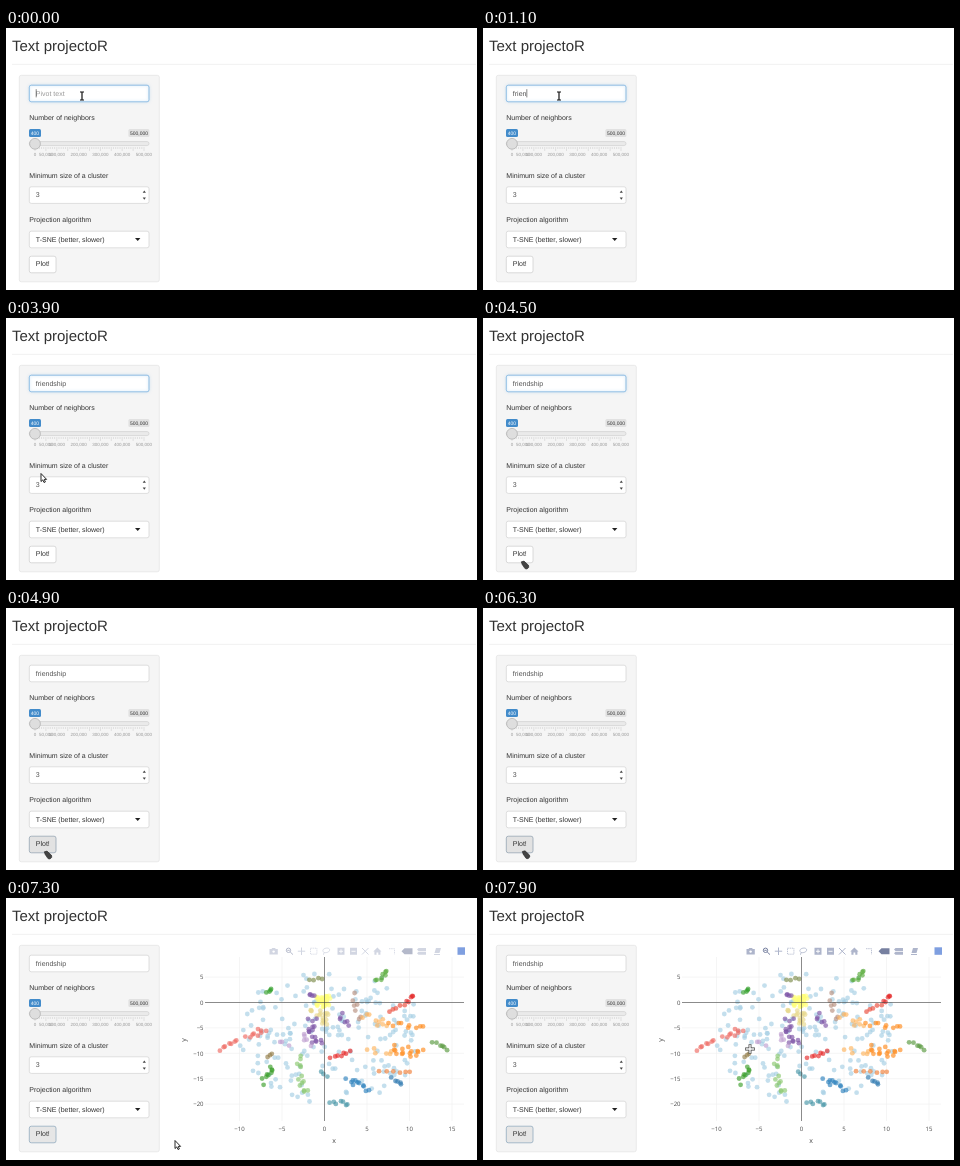
Write an HTML page that moves like this. It is 471 px wide and 262 px high and loops after 8000 ms.

```html
<!DOCTYPE html>
<html lang="en">
<head>
<meta charset="utf-8">
<title>Text projectoR</title>
<style>
html, body { margin: 0; width: 100%; height: 100%; overflow: hidden; background: #fff; }
svg { display: block; width: 471px; height: 262px; text-rendering: geometricPrecision; }
text { font: 7px "Liberation Sans", Arial, sans-serif; fill: #333; }
.title { font-size: 15px; }
.field { fill: #fff; stroke: #ccc; stroke-width: .6; }
.value { fill: #555; }
.tag { font-size: 5px; }
.scale text { font-size: 4.5px; fill: #999; text-anchor: middle; }
.scale path { stroke: #aaa; stroke-width: .3; }
#glow { fill: none; stroke: #7dbbec; stroke-width: .7; filter: drop-shadow(0 0 1.5px rgba(102,175,233,.6)); }
#plot text { font: 6px "Open Sans", Verdana, sans-serif; fill: #444; }
#plot .name { font-size: 7px; text-anchor: middle; }
#grid path { stroke: #eee; stroke-width: .6; }
#bar { fill: none; stroke: #aeb5cb; stroke-width: 1; }
#bar .solid { fill: #aeb5cb; stroke: none; }
#bar .on { stroke: #7780a0; }
#bar .solid.on { fill: #7780a0; stroke: none; }
</style>
</head>
<body>
<svg viewBox="0 0 471 262">
  <text class="title" x="6" y="23.3">Text projectoR</text>
  <path d="M6 36.4H470" stroke="#eee" stroke-width=".8"/>
  <rect x="13.3" y="47.3" width="140" height="206.5" rx="2" fill="#f5f5f5" stroke="#e3e3e3" stroke-width=".7"/>

  <rect class="field" x="23.3" y="57.2" width="119.7" height="16.6" rx="2"/>
  <rect id="glow" x="23.3" y="57.2" width="119.7" height="16.6" rx="2"/>
  <text id="typed" class="value" x="29.8" y="67.6"></text>
  <path id="caret" d="M0 61.2V69.4" stroke="#333" stroke-width=".6"/>

  <text x="23.3" y="92.2">Number of neighbors</text>
  <rect x="23" y="101" width="12" height="8" rx="1.5" fill="#428bca"/>
  <text class="tag" x="24.8" y="106.7" style="fill:#fff">400</text>
  <rect x="122.4" y="101" width="21" height="8" rx="1.5" fill="#e1e1e1"/>
  <text class="tag" x="124" y="106.7">500,000</text>
  <rect x="23.3" y="113.6" width="119.7" height="4" rx="2" fill="#eaeaea" stroke="#ccc" stroke-width=".6"/>
  <g class="scale" id="scale"></g>
  <circle cx="29" cy="115.8" r="5.4" fill="#dedede" stroke="#ababab" stroke-width=".7"/>

  <text x="23.3" y="149.6">Minimum size of a cluster</text>
  <rect class="field" x="23.3" y="158.8" width="119.7" height="16.6" rx="2"/>
  <text class="value" x="29.8" y="169.4">3</text>
  <path d="M136.7 164.7L138.3 162.4L139.9 164.7ZM136.7 169.5L138.3 171.8L139.9 169.5Z" fill="#444"/>

  <text x="23.3" y="193.8">Projection algorithm</text>
  <rect class="field" x="23.3" y="203.2" width="119.7" height="16.6" rx="2"/>
  <text x="29.8" y="213.7">T-SNE (better, slower)</text>
  <path d="M129 210H134.4L131.7 213Z" fill="#222"/>

  <rect id="button" x="23.3" y="228.2" width="26.7" height="16.6" rx="2" stroke-width=".7"/>
  <text x="29.8" y="238.3">Plot!</text>

  <g id="plot">
    <g id="grid"></g>
    <g id="dots"></g>
    <path d="M318.5 59V223M199 104.5H458" stroke="#444" stroke-width=".6"/>
    <text class="name" x="328" y="244.5">x</text>
    <text class="name" transform="translate(180 142) rotate(-90)">y</text>
    <g id="bar">
      <path class="solid" d="M263.5 51H265.5L266.3 50H269L269.8 51H271.8V56.5H263.5Z"/>
      <circle cx="267.6" cy="53.6" r="1.2" fill="#fff" stroke="none"/>
      <g class="on"><circle cx="282.5" cy="52.3" r="2.2"/><path d="M284.2 54L287 56.6M281.3 52.3H283.7"/></g>
      <path d="M295.5 49.5V57M291.8 53.2H299.2"/>
      <rect x="304.5" y="50.2" width="6.4" height="6" stroke-dasharray="1.3 .8" stroke-width=".8"/>
      <path d="M317.5 56.8L318 54.5C314 51 322 48.5 323.5 51.2C324.5 54 320 55.2 318 54.5" stroke-width=".8"/>
      <path class="solid" d="M331.5 49.8H338.5V56.8H331.5ZM344 49.8H351V56.8H344Z"/>
      <path d="M333 53.3H337M335 51.3V55.3M345.5 53.3H349.5" stroke="#fff" stroke-width=".9"/>
      <path d="M356 50L362.5 56.5M362.5 50L356 56.5"/>
      <path class="solid" d="M367.3 53.5L371.4 49.5L375.5 53.5H374.4V56.8H372.3V54.5H370.5V56.8H368.4V53.5Z"/>
      <path d="M383 50.7H388.5V56.5" stroke-width=".8" stroke-dasharray="1.5 .7"/>
      <path class="solid on" d="M395.5 53.2L398.5 50.2H406.5V56.2H398.5Z"/>
      <path class="solid" d="M411 51.5L412.5 50H420V53H412.5ZM411 55.2L412.5 53.8H420V56.7H412.5Z"/>
      <path class="solid" d="M428.5 55L430 50H435L433.5 55ZM428 56H434V57H428Z"/>
    </g>
    <rect x="451.5" y="49.3" width="7.5" height="7.5" fill="#7f9fe0"/>
  </g>

  <g id="cursor">
    <path id="beam" d="M-2-4H2M0-4V4M-2 4H2" fill="none" stroke="#111" stroke-width="1.2"/>
    <path id="arrow" d="M0 0V8L1.8 6.4L3 9L4.4 8.4L3.2 5.900H5.600Z" fill="#fff" stroke="#111" stroke-width=".9"/>
    <path id="hand" d="M.3 1.500L3 .8L7.500 5L7.800 7L6 8.700L4 8.300L1.200 4.200Z" fill="#444" stroke="#222" stroke-width=".6"/>
    <g id="cross"><path d="M-4.800 0H4.800M0-4.800V4.800" stroke="#333" stroke-width="2.800"/><path d="M-4.200 0H4.200M0-4.200V4.200" stroke="#fff" stroke-width="1.400"/></g>
  </g>
</svg>
<script>
const $ = id => document.getElementById(id);
const LOOP = 8000;

function add(parent, tag, attrs, text = '') {
  const el = document.createElementNS('http://www.w3.org/2000/svg', tag);
  for (const key in attrs) el.setAttribute(key, attrs[key]);
  el.textContent = text;
  return parent.appendChild(el);
}

// Slider scale: a major tick every 50,000
for (let i = 0; i <= 50; i++) {
  const x = 29 + i * 2.18;
  add($('scale'), 'path', { d: `M${x} 119v${i % 5 ? 2 : 4}` });
}
for (const n of [0, 50, 100, 200, 300, 400, 500])
  add($('scale'), 'text', { x: 29 + n * .218, y: 127.6 }, n ? n + ',000' : '0');

// Plot axes
const px = v => 318.5 + v * 8.5, py = v => 104.5 - v * 5.08;
const label = v => String(v).replace('-', '−');
for (let v = -10; v <= 15; v += 5) {
  add($('grid'), 'path', { d: `M${px(v)} 59V223` });
  add($('grid'), 'text', { x: px(v), y: 233.2, 'text-anchor': 'middle' }, label(v));
}
for (let v = -20; v <= 5; v += 5) {
  add($('grid'), 'path', { d: `M199 ${py(v)}H458` });
  add($('grid'), 'text', { x: 197.5, y: py(v) + 2.2, 'text-anchor': 'end' }, label(v));
}

// Scatter: loose background dots, then streaks of clustered ones
let seed = 11;
const rand = () => (seed = seed * 16807 % 2147483647) / 2147483647;
const dot = (x, y, fill) =>
  add($('dots'), 'circle', { cx: x.toFixed(1), cy: y.toFixed(1), r: 2.4, fill, 'fill-opacity': .66 });

for (let i = 0; i < 180; i++) {
  const a = rand() * 2 * Math.PI, r = Math.pow(rand(), .55);
  dot(325 + 92 * r * Math.cos(a), 137 + 70 * r * Math.sin(a), '#a6cee3');
}

function streak(fill, x0, y0, x1, y1, count, spread = 3) {
  for (let i = 0; i < count; i++) {
    const k = i / (count - 1);
    dot(x0 + (x1 - x0) * k + (rand() - .5) * 2 * spread,
        y0 + (y1 - y0) * k + (rand() - .5) * 2 * spread, fill);
  }
}
streak('#e6d88c', 310, 117, 319, 122, 18, 6);
streak('#ffff78', 314, 103, 319, 104, 30, 6);
streak('#5aab3c', 379, 71, 371, 85, 8);
streak('#33a02c', 266, 90, 261, 95, 4, 1);
streak('#7c8c4c', 304, 81, 317, 80, 4, 2);
streak('#7d54a5', 302, 97, 309, 98, 4, 2);
streak('#7d54a5', 306, 124, 311, 143, 16, 7);
streak('#7d54a5', 334, 117, 341, 126, 6);
streak('#c0a0d0', 273, 146, 282, 147, 3);
streak('#c0a0d0', 296, 137, 304, 145, 5);
streak('#b89080', 346, 98, 354, 121, 7);
streak('#e32a2a', 406, 97, 401, 105, 5, 2);
streak('#ea4a3a', 397, 108, 382, 113, 5, 2);
streak('#ee6a62', 259, 131, 241, 139, 9, 3);
streak('#ee6a62', 231, 141, 214, 152, 7, 1.5);
streak('#94804c', 265, 156, 262, 159, 3, 1);
streak('#3ca02c', 267, 168, 257, 184, 9);
streak('#8cc870', 292, 159, 296, 170, 5);
streak('#8cc870', 294, 180, 301, 194, 8, 4);
streak('#e52a2a', 325, 160, 344, 154, 7, 1.5);
streak('#2f82bd', 342, 180, 362, 192, 11, 3);
streak('#2f7ab0', 387, 180, 396, 188, 5, 2);
streak('#4a98a8', 315, 173, 321, 179, 3, 1.5);
streak('#4a98a8', 325, 204, 342, 206, 7, 2);
streak('#fdb45f', 356, 119, 385, 128, 9, 5);
streak('#ff8c1e', 382, 126, 418, 130, 9, 3);
streak('#fdb45f', 363, 150, 388, 156, 6, 4);
streak('#ff8c1e', 386, 150, 415, 156, 15, 5);
streak('#f0803a', 374, 172, 405, 174, 6, 1.5);
streak('#5a9a40', 427, 143, 442, 152, 6, 1.5);

// Each track is a list of [start time, ...values]; values hold until the next entry
const typing = [[0, ''], [500, 'f'], [700, 'fri'], [1100, 'frien'], [1900, 'friends'], [2500, 'friendshi'], [3300, 'friendship']];
const caret = [[0, 1], [3300, 0], [4100, 1], [4300, 0]];
const focus = [[0, 1], [4700, .45], [4900, 0]];
const button = [[0, '#fff', '#ccc'], [4100, '#e6e6e6', '#adadad'], [4300, '#fff', '#ccc'], [4700, '#e2e2e2', '#8b9dac'], [6500, '#e6e6e6', '#86a2b8']];
const bar = [[0, .55], [7500, .75], [7700, 1]];
const pointer = [
  [0, 'beam', 76, 68], [3300, 'beam', 76, 67], [3500, 'beam', 76, 66.5],
  [3700, 'arrow', 76, 83.5], [3900, 'arrow', 35, 155.5], [4100, 'hand', 38, 235],
  [4300, 'arrow', 40, 252.5], [4500, 'hand', 38, 242.3], [6300, 'hand', 39, 242],
  [6500, 'arrow', 109, 243], [6700, 'arrow', 118, 243], [6900, 'arrow', 135, 243],
  [7100, 'arrow', 166, 242.3], [7300, 'arrow', 169, 242.5], [7500, 'arrow', 171, 242],
  [7700, 'cross', 240, 176], [7900, 'cross', 267, 151]
];
const at = (track, t) => track.findLast(step => step[0] <= t).slice(1);

function draw(now) {
  const t = now % LOOP;
  const [word] = at(typing, t);
  $('typed').textContent = word || 'Pivot text';
  $('typed').style.fill = word ? '#555' : '#999';
  const end = word ? $('typed').getComputedTextLength() : 0;
  $('caret').setAttribute('transform', `translate(${30.2 + end})`);
  $('caret').style.opacity = at(caret, t)[0];
  $('glow').style.opacity = at(focus, t)[0];

  const [fill, stroke] = at(button, t);
  $('button').style.fill = fill;
  $('button').style.stroke = stroke;

  $('plot').style.display = t < 7300 ? 'none' : '';
  $('bar').style.opacity = at(bar, t)[0];

  const [kind, x, y] = at(pointer, t);
  for (const el of $('cursor').children) el.style.display = el.id === kind ? '' : 'none';
  $('cursor').setAttribute('transform', `translate(${x} ${y})`);
}

const start = performance.now();
function tick() {
  draw(performance.now() - start);
  requestAnimationFrame(tick);
}
tick();
</script>
</body>
</html>
```
